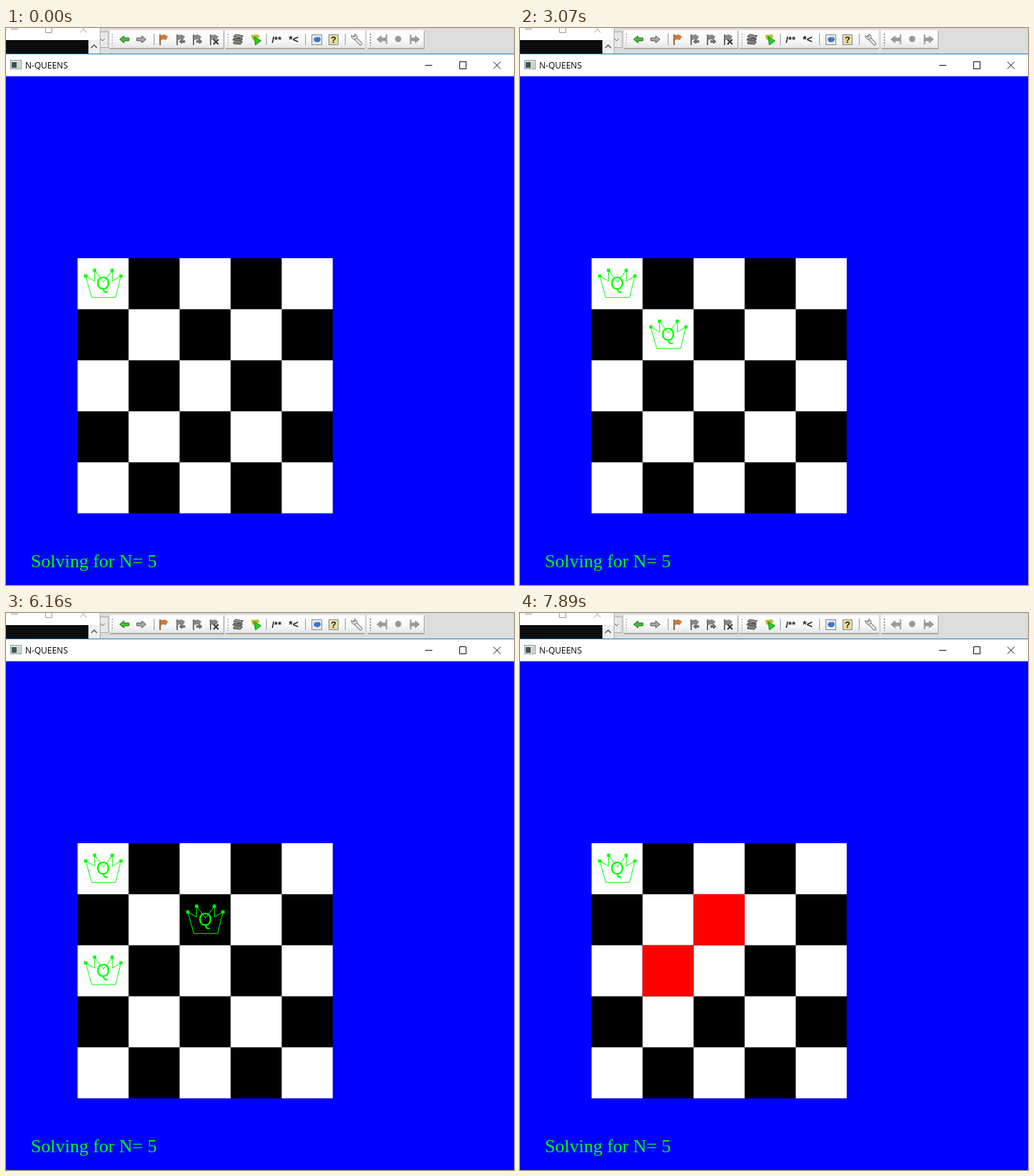
Animation, 715 px wide and 784 px high, one loop 8 s. Source, as an HTML page:

```html
<!DOCTYPE html>
<html lang="en">
<head>
<meta charset="utf-8">
<title>N-Queens</title>
<style>
  html, body { margin: 0; width: 100%; height: 100%; overflow: hidden; background: #00f; }
  svg { display: block; width: 100%; height: 100%; }
  .line { fill: none; stroke: #111; }
  .status { font: 26px "Liberation Serif", serif; fill: #0f0; white-space: pre; }
  .title { font: 12px "Open Sans", sans-serif; }
  .letter { font: 25px "Liberation Sans", sans-serif; fill: #0f0; }
  .code { font: bold 13px "Liberation Sans", sans-serif; fill: #222; }
</style>
</head>
<body>
<svg viewBox="0 0 715 784" preserveAspectRatio="none">
  <defs>
    <linearGradient id="panel" x2="0" y2="1">
      <stop stop-color="#fff"/><stop offset=".6" stop-color="#f8f8f8"/><stop offset="1" stop-color="#e6e6e6"/>
    </linearGradient>
    <pattern id="grip" width="4" height="4" patternUnits="userSpaceOnUse">
      <rect width="2" height="2" fill="#999"/>
    </pattern>
    <g id="crown">
      <path d="M11.5 25 20 55.3H53.5L61 25 49 32.2V17L36.4 33.5 24 17V32.2Z" fill="none" stroke="#0f0"/>
      <path d="M9.3 22.7h4.5v4.5h-4.5zM21.7 14.7h4.5v4.5h-4.5zM46.5 14.7h4.5v4.5h-4.5zM58.8 22.7h4.5v4.5h-4.5z" fill="#0f0"/>
    </g>
    <path id="arrow" d="M0 5 6 0V3H13V7H6V10Z" stroke-width="1"/>
    <g id="flag">
      <path d="M0 0 4 1 7 0 12 3 9 8 6 7 2 8V15H0Z"/>
      <path d="M.5 0V15" stroke="#555"/>
    </g>
  </defs>

  <!-- windows behind -->
  <rect width="715" height="37" fill="#dcdcdc"/>
  <g>
    <path d="M146 4H307V30H146zM309 4H505V30H309zM509 4H589V30H509z" fill="#aaa"/>
    <path d="M146 3H306V28H146zM308 3H505V28H308zM508 3H588V28H508z" fill="url(#panel)"/>
    <path d="M149 7h3v18h-3zM310 7h3v18h-3zM511 7h3v18h-3z" fill="url(#grip)"/>
    <path d="M208.5 8V24M366.5 8V24M421.5 8V24M477.5 8V24" stroke="#999"/>
    <rect x="130" y="5.5" width="14" height="22" fill="#e8e8e8" stroke="#aaa"/>
    <path d="M133 15l3 3 3-3" class="line" style="stroke:#666"/>
  </g>
  <use href="#arrow" x="160" y="11" fill="#3fc72f" stroke="#176d12"/>
  <use href="#arrow" transform="translate(197 11) scale(-1 1)" fill="#aaa" stroke="#555"/>
  <use href="#flag" x="216" y="9" fill="#c77b42"/>
  <g fill="#888">
    <use href="#flag" x="240" y="9"/><use href="#flag" x="263" y="9"/><use href="#flag" x="287" y="9"/>
  </g>
  <use href="#arrow" transform="translate(244 16) scale(.6)" fill="#777" stroke="#333"/>
  <use href="#arrow" transform="translate(276 16) scale(-.6 .6)" fill="#777" stroke="#333"/>
  <path d="M292 16l7 7m0-7-7 7" stroke="#333" stroke-width="2"/>
  <g stroke="#444">
    <path d="M323 9 334 11 331 14 320 12Z" fill="#999"/>
    <path d="M321 14 333 15 331 18 319 17Z" fill="#777"/>
    <path d="M321 19 333 19 330 23 320 22Z" fill="#8b8b72"/>
  </g>
  <path d="M345 10 355 9 357 13 347 17Z" fill="#c5b82e"/>
  <path d="M349 12 359 18 351 24Z" fill="#22cf22" stroke="#169016"/>
  <text class="code" x="374" y="21">/**</text>
  <text class="code" x="398" y="21" style="font-size:14px">*&lt;</text>
  <g stroke="#888">
    <rect x="430.5" y="9.5" width="14" height="14" fill="#e8edf2"/>
    <rect x="454.5" y="9.5" width="13" height="14" fill="#e9dea0"/>
  </g>
  <ellipse cx="438" cy="16" rx="5" ry="4" fill="#3f78c0"/>
  <path d="M434 14q3-3 6-1" stroke="#b9dcf6" fill="none"/>
  <text class="code" x="457" y="21">?</text>
  <path d="M490 13 499 22" stroke="#777" stroke-width="5" stroke-linecap="round"/>
  <path d="M490 13 499 22" stroke="#eee" stroke-width="3" stroke-linecap="round"/>
  <path d="M486 10q0 6 5 6 4-1 3-5l-3-3v4h-3z" fill="#ddd" stroke="#777"/>
  <g fill="#999" stroke="#999">
    <use href="#arrow" x="522" y="11"/><path d="M535.5 9V23" stroke-width="2"/>
    <circle cx="552" cy="15.5" r="4"/>
    <use href="#arrow" transform="translate(582 11) scale(-1 1)"/><path d="M569.5 9V23" stroke-width="2"/>
  </g>

  <rect width="133" height="17" fill="#fff"/>
  <rect y="17" width="116" height="19" fill="#0c0c0c"/>
  <rect x="116" y="17" width="16" height="19" fill="#f0f0f0"/>
  <path d="M132.5 0V36" stroke="#aaa"/>
  <path d="M7 1.5H17M55.5 0V6.5H64.5V0M104 6.5l6-6m-2 0 5.500 6" class="line" style="stroke:#999"/>
  <path d="M120 28l4-4 4 4" class="line" stroke-width="1.5" style="stroke:#555"/>

  <!-- main window -->
  <rect y="36" width="715" height="33" fill="#fff"/>
  <path d="M0 36.500H715" stroke="#2b7cb5"/>
  <rect x="6.500" y="45.500" width="15" height="12" fill="#dfe5e5" stroke="#899"/>
  <rect x="8" y="48" width="7" height="8" fill="#3e5552"/>
  <path d="M16 49h4M16 52h4M16 55h4" stroke="#aaa"/>
  <text class="title" x="27" y="57">N-QUEENS</text>
  <path d="M590 52.500H600M638.500 47.500H647.500V57.500H638.500ZM686 47.500l10 10m0-10-10 10" class="line"/>
  <rect y="68" width="715" height="716" fill="#00f"/>
  <g id="board"></g>
  <text class="status" x="35" y="759">Solving for N= 5</text>
</svg>
<script>
const LOOP = 8000, SIZE = 5, CELL = 71.83, LEFT = 100.7, TOP = 324;
const board = document.getElementById('board');

function add(parent, tag, attrs) {
  const el = document.createElementNS('http://www.w3.org/2000/svg', tag);
  for (const key in attrs) el.setAttribute(key, attrs[key]);
  return parent.appendChild(el);
}

function cell(row, col, fill) {
  return add(board, 'rect', {
    x: LEFT + col * CELL, y: TOP + row * CELL, width: CELL, height: CELL, fill
  });
}

function queen(row, col) {
  const group = add(board, 'g', {
    transform: `translate(${LEFT + col * CELL} ${TOP + row * CELL})`
  });
  add(group, 'use', { href: '#crown' });
  const letter = add(group, 'text', { class: 'letter', x: 26.3, y: 44 });
  letter.textContent = 'Q';
  return { group, letter };
}

add(board, 'rect', { x: LEFT, y: TOP, width: SIZE * CELL, height: SIZE * CELL });
for (let row = 0; row < SIZE; row++)
  for (let col = row % 2; col < SIZE; col += 2) cell(row, col, '#fff');

// Each part is shown during its [start, end) spans.
const parts = [];
const show = (el, ...spans) => parts.push({ el, spans });

const third = queen(2, 0);
show(third.group, [6160, 6510], [6840, 7540]);
show(third.letter, [6160, 6510], [7190, 7540]);
show(queen(0, 0).group, [0, 2060], [2390, 3420], [4100, 6510], [6840, LOOP]);
show(queen(1, 0).group, [1360, 2060], [2390, 3070]);
show(queen(1, 1).group, [3070, 3420], [4100, 4450]);
show(queen(1, 2).group, [4450, 7890]);
show(queen(2, 1).group, [7540, 7890]);

function conflict(start, end, ...squares) {
  for (const [row, col] of squares) show(cell(row, col, '#f00'), [start, end]);
}
conflict(2060, 2390, [0, 0], [1, 0]);
conflict(3420, 4100, [0, 0], [1, 1]);
conflict(6510, 6840, [0, 0], [2, 0]);
conflict(7890, LOOP, [1, 2], [2, 1]);

function render(time) {
  for (const { el, spans } of parts) {
    const on = spans.some(([start, end]) => time >= start && time < end);
    el.style.display = on ? '' : 'none';
  }
}

const begin = performance.now();
function tick() {
  render((performance.now() - begin) % LOOP);
  requestAnimationFrame(tick);
}
render(0);
requestAnimationFrame(tick);
</script>
</body>
</html>
```
